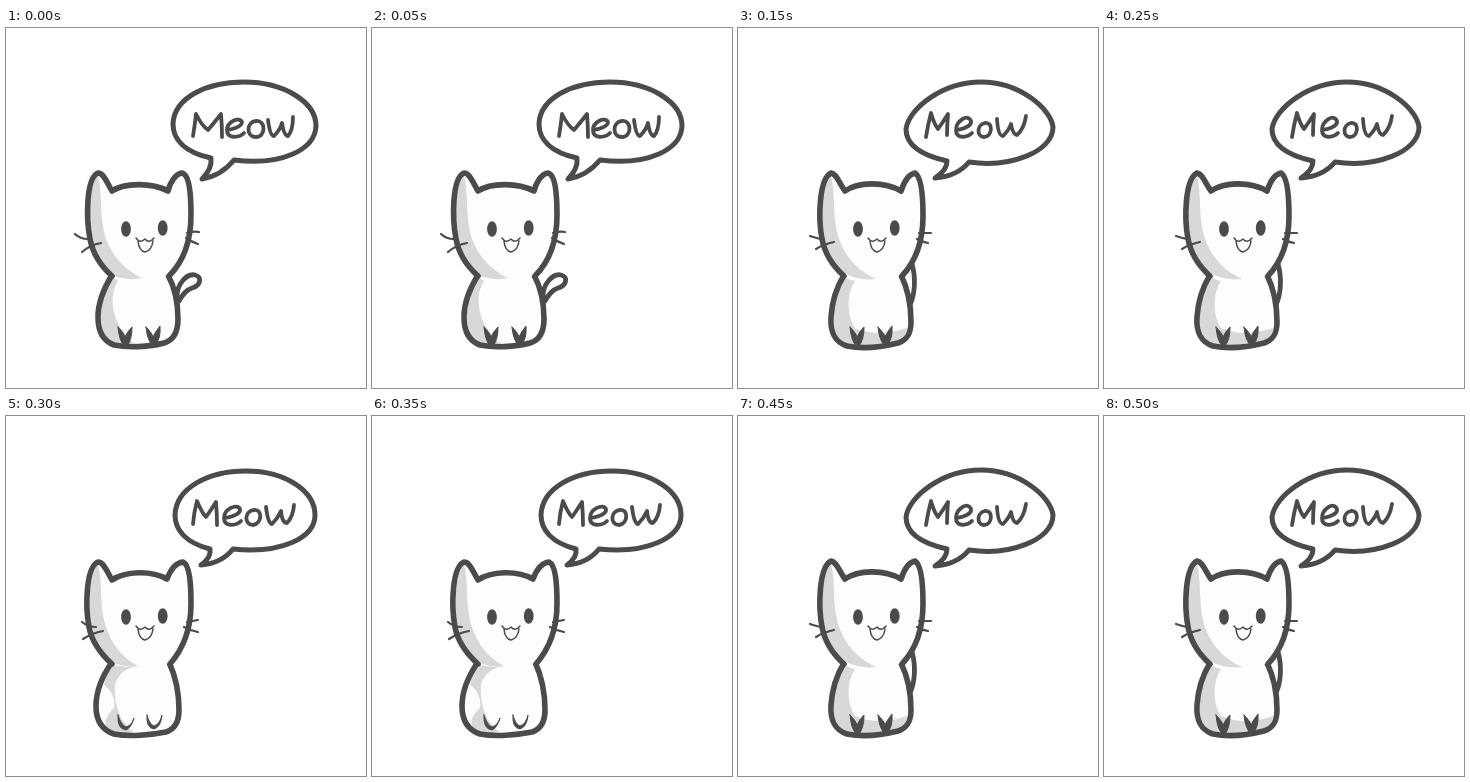
These frames come from a looping animation (360x360 px, 550 ms). An HTML page with a canvas:

```html
<!DOCTYPE html>
<html lang="en">
<head>
<meta charset="utf-8">
<title>Meow</title>
<style>
html, body { margin: 0; width: 100%; height: 100%; overflow: hidden; background: #fff; }
canvas { display: block; width: 360px; height: 360px; }
</style>
</head>
<body>
<canvas id="stage" width="360" height="360"></canvas>
<script>
const ctx = document.getElementById('stage').getContext('2d');
const INK = '#4b4b4b', SHADE = '#d8d8d8', FUR = '#fdfdfd';
const LOOP = 550, HOLD = 150;

const pointedPaws = 'M112 299Q118 305 119 309Q121 304 126 299Q126 312 121 318L118 318Q113 312 112 299ZM140 299Q146 305 147 309Q149 304 154 298Q155 311 149 317L146 317Q141 311 140 299Z';

// Each pose is a separate hand-drawn version of the same cat.
const poses = [
  {
    head: 'M106 248C96 239 87 227 84 211C80 190 80 150 92 145C98 145 101 155 106 163C118 155 145 154 162 163C164 155 169 146 176 145C184 147 185 170 185 187C185 212 178 233 163 248',
    body: 'M106 247C98 260 92 275 92 289C92 303 97 313 108 317C122 320 143 319 158 315C168 312 172 304 172 291C172 273 169 260 162 247',
    tail: 'M171 268C171 256 181 245 189 247C197 249 194 258 186 260C180 262 177 266 173 273',
    whiskers: 'M69 206Q74 211 82 211M76 224Q84 217 95 215M181 205Q188 203 193 204M180 210Q186 214 192 216',
    paws: pointedPaws,
    face: 'M92 147C85 155 82 180 84 202C87 223 96 240 108 248Q122 253 136 250C115 240 101 222 97 199C94 180 96 164 92 147Z',
    belly: 'M107 249Q110 252 112 253C103 266 106 288 116 302Q122 312 130 316Q111 319 102 312C90 298 95 266 107 249Z',
    bubble: 'M205 130C178 124 167 111 167 96C168 70 200 54 238 54C278 54 310 74 310 98C309 122 275 138 228 132C219 143 208 149 196 151C203 144 206 138 205 130Z',
    word: 'M187 108Q189 96 190 86Q196 98 202 102Q208 95 215 86Q216 98 216 109M222 102Q236 99 236 94C233 88 221 94 221 102C221 111 233 110 238 105M250 93C240 94 240 109 250 109C260 109 260 92 250 93M262 92Q264 108 268 108Q274 102 276 95Q278 108 282 108Q287 102 287 89'
  },
  {
    head: 'M106 248C96 239 87 227 84 211C80 190 81 151 93 145C99 146 101 155 107 163C120 154 146 153 163 163C166 154 171 146 177 145C184 149 185 170 185 188C185 212 178 233 164 248',
    body: 'M106 247C98 260 94 274 93 289C92 305 97 314 109 318C124 321 144 319 160 315C169 312 173 306 173 294C173 274 169 259 163 247',
    tail: 'M174 236C178 250 177 266 172 277',
    whiskers: 'M72 208Q80 211 86 211M78 221Q86 216 96 214M181 205L193 205M179 211Q184 214 190 215',
    paws: pointedPaws,
    face: 'M93 147C85 157 82 181 84 202C87 222 95 237 108 246Q122 253 138 251C116 241 102 222 98 199C95 180 97 164 93 147Z',
    belly: 'M107 249Q111 252 117 253C108 266 109 288 117 300Q140 310 169 300Q168 312 158 315Q128 319 109 317C88 311 95 266 107 249Z',
    bubble: 'M209 133C182 127 168 116 168 101C171 80 205 54 243 54C282 54 313 81 315 99C315 124 272 140 231 134C222 145 210 149 197 150C205 145 209 139 209 133Z',
    word: 'M188 109Q190 96 193 85Q196 96 200 101Q205 94 210 86Q209 98 209 107M219 102Q234 99 233 93C230 85 218 93 218 102C218 111 229 110 234 105M247 95C238 97 239 109 246 109C254 109 256 94 247 95M259 91Q260 108 265 108Q271 102 273 96Q275 107 279 107Q286 101 288 88'
  },
  {
    head: 'M106 248C96 239 86 227 83 211C79 190 80 151 92 146C98 146 101 156 106 164C119 155 145 154 161 163C164 155 169 147 177 146C184 149 185 170 185 188C185 212 177 233 164 248',
    body: 'M106 246C97 259 90 274 90 290C90 305 96 314 108 318C123 321 145 319 160 316C169 313 173 306 173 294C173 275 169 259 163 246',
    tail: '',
    whiskers: 'M76 206Q82 211 90 211M77 223Q86 217 97 215M181 206L192 204M178 211Q185 215 192 216',
    paws: 'M112 299Q111 313 120 314Q125 312 128 302Q126 309 120 311Q115 309 112 299ZM141 299Q140 312 148 313Q155 311 156 299Q154 308 148 310Q143 308 141 299Z',
    face: 'M92 148C85 157 82 181 84 202C87 222 95 237 108 247Q121 252 132 250C113 240 101 222 97 199C94 180 96 164 92 148Z',
    belly: 'M107 249Q120 252 132 250Q115 252 109 268C108 288 113 306 128 316Q111 319 101 312Q96 303 108 292Q110 278 98 269Q100 257 107 249Z',
    bubble: 'M204 133C180 127 169 114 169 99C170 72 202 55 240 55C281 55 309 76 309 99C309 122 275 138 227 133C219 143 208 148 195 149C202 144 205 139 204 133Z',
    word: 'M187 108Q188 96 191 85Q196 97 200 101Q205 94 210 86Q211 98 211 109M219 102Q235 99 234 93C231 87 218 93 218 102C218 111 230 110 235 105M248 94C238 95 238 109 247 109C256 108 257 93 248 94M260 91Q262 108 266 108Q272 102 275 95Q276 107 281 107Q287 101 288 89'
  }
];
for (const pose of poses)
  for (const part in pose) pose[part] = new Path2D(pose[part]);

const mouth = new Path2D('M130 210Q134 216 139 211Q143 216 148 210M132 213Q133 223 139 224Q146 222 147 213');
const order = [0, 1, 2, 1];

function fill(path, color) {
  ctx.fillStyle = color;
  ctx.fill(path);
}

function stroke(path, width) {
  ctx.lineWidth = width;
  ctx.strokeStyle = INK;
  ctx.stroke(path);
}

function eye(x, y) {
  ctx.beginPath();
  ctx.ellipse(x, y, 4.9, 7.8, 0, 0, Math.PI * 2);
  ctx.fillStyle = INK;
  ctx.fill();
}

function draw(pose) {
  ctx.fillStyle = '#fff';
  ctx.fillRect(0, 0, 360, 360);
  ctx.lineCap = ctx.lineJoin = 'round';

  stroke(pose.tail, 4.8);
  fill(pose.body, FUR);
  fill(pose.belly, SHADE);
  stroke(pose.body, 5.6);
  fill(pose.paws, INK);
  stroke(pose.paws, 1);
  fill(pose.head, FUR);
  fill(pose.face, SHADE);
  stroke(pose.head, 5.6);
  stroke(pose.whiskers, 2.2);
  eye(120, 201);
  eye(156.7, 200);
  stroke(mouth, 1.5);

  fill(pose.bubble, '#fff');
  stroke(pose.bubble, 5);
  stroke(pose.word, 3.8);
}

function frame() {
  const time = performance.now() % LOOP;
  draw(poses[order[Math.floor(time / HOLD)]]);
  requestAnimationFrame(frame);
}
frame();
</script>
</body>
</html>
```
